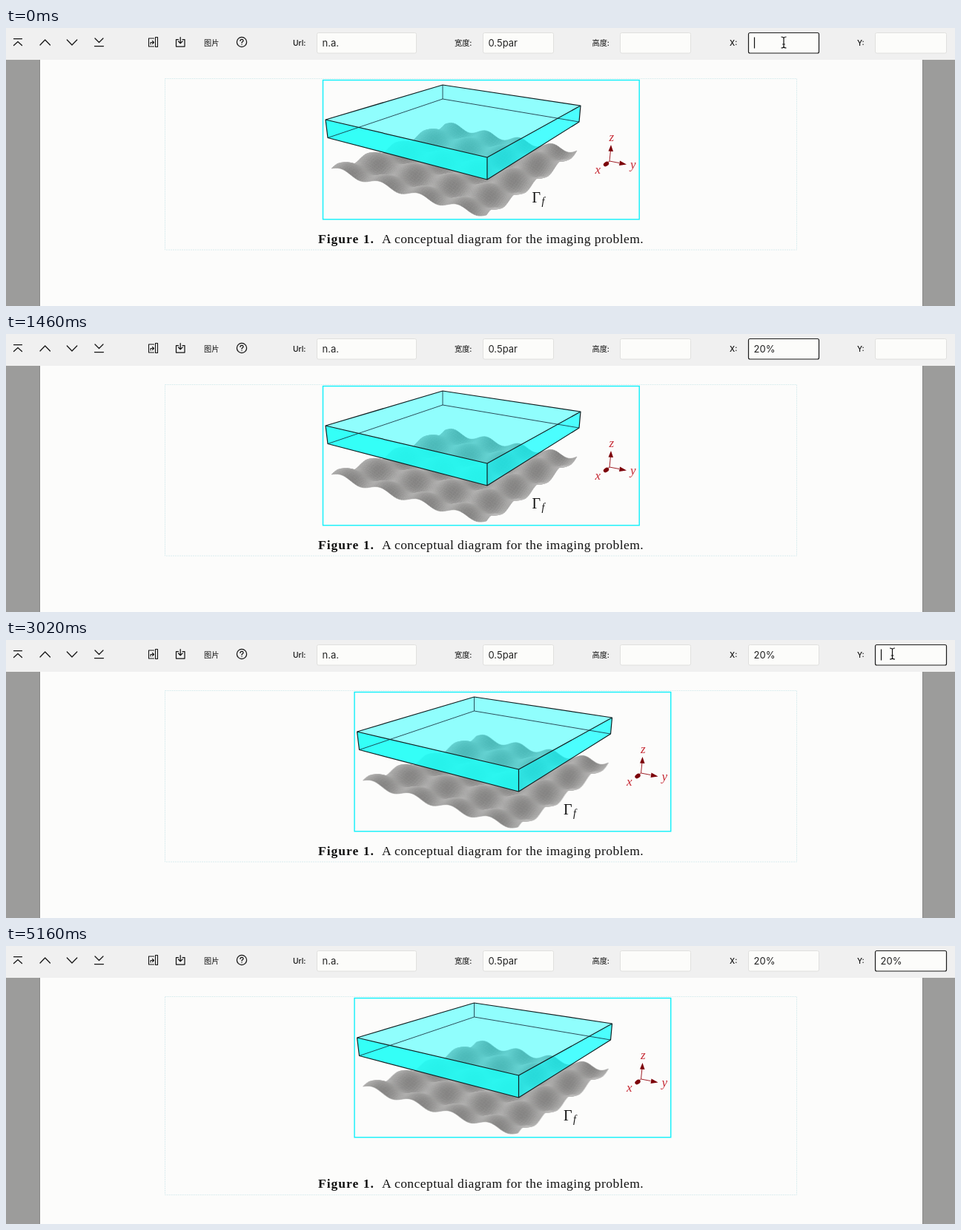
An HTML page with a canvas for the animation above (5180 ms loop, 1280 px wide and 376 px high).

```html
<!DOCTYPE html>
<html lang="zh">
<head>
<meta charset="utf-8">
<style>
html, body { margin: 0; width: 100%; height: 100%; overflow: hidden; background: #fcfcfb; }
canvas, svg { position: absolute; display: block; left: 0; top: 0; }
#surface { left: 430px; top: 110px; }
#stage { width: 100%; height: 100%; overflow: hidden; }
text { white-space: pre; }
.label { font: 500 10.2px Inter, "Noto Sans CJK SC", "Noto Sans CJK", sans-serif; fill: #111; }
.value { font: 13px Inter, sans-serif; fill: #222; }
.field { fill: #fcfcfa; stroke: #e0e0de; }
.field.focus { stroke: #1c1c1c; stroke-width: 1.2; }
.icon { fill: none; stroke: #151515; stroke-width: 1.25; stroke-linecap: round; stroke-linejoin: round; }
.math { font: italic 17px "Liberation Serif", serif; }
#caption { font: 17.5px "Liberation Serif", serif; letter-spacing: .45px; fill: #111; }
#caption .head { font-weight: bold; letter-spacing: 1px; }
</style>
</head>
<body>
<canvas id="surface" width="350" height="150"></canvas>
<svg id="stage" viewBox="0 0 1280 376">
  <path d="M0 43H45.5V376H0zM1236.5 43H1280V376H1236.5z" fill="#9c9c9b"/>
  <path d="M45.5 43V376M1236.5 43V376" stroke="#878786"/>
  <rect id="frame" x="214.5" y="68.5" width="852" height="231.5" fill="none" stroke="#d8ecee" stroke-dasharray="2 1"/>

  <g id="figure">
    <path d="M431 124L589 77 775 105 649 175z" fill="#0ff" fill-opacity=".43"/>
    <path d="M431 124L649 175V205L434 148.5z" fill="#1cfff8" fill-opacity=".89"/>
    <path d="M775 105L649 175V205L773 127z" fill="#0ff" fill-opacity=".7"/>
    <path d="M589 77V96L434 148.5M589 96L773 127" fill="none" stroke="#123" stroke-width=".8"/>
    <path d="M431 124L589 77 775 105 649 175zL434 148.5 649 205 773 127 775 105M649 175V205" fill="none" stroke="#102022" stroke-width="1.2" stroke-linejoin="round"/>
    <path d="M814 180L815.5 165M814 180L827 182.5M814 180L809 184" stroke="#a02028" fill="none"/>
    <path d="M816 158L819 167 812.5 166.5zM837 184.5L827 186 828 179.5z" fill="#7c0008"/>
    <ellipse cx="809.5" cy="184" rx="4" ry="2.8" transform="rotate(-35 809.5 184)" fill="#7c0008"/>
    <g class="math" fill="#c62a34">
      <text x="813.5" y="153">z</text><text x="794.5" y="197">x</text><text x="842" y="190">y</text>
    </g>
    <text x="709.5" y="236" font-family="Liberation Serif, serif" font-size="20" fill="#111">Γ</text>
    <text x="722.5" y="238.5" class="math" style="font-size:14px" fill="#111">f</text>
    <rect x="427.5" y="70.5" width="426.7" height="188.3" fill="none" stroke="#0ff0fa" stroke-width="1.4"/>
  </g>
  <text id="caption" y="290.5"><tspan class="head" x="421">Figure 1.</tspan><tspan x="507">A conceptual diagram for the imaging problem.</tspan></text>

  <rect width="1280" height="43" fill="#f0f0f0"/>
  <g class="icon">
    <path d="M10.5 14.5H21.5M10.5 23.5L16 18.5 21.5 23.5"/>
    <path d="M46 23L52.7 16 59.5 23M82.3 16L89 23 95.8 16"/>
    <path d="M119.5 24.5H131.5M120 14L125.5 19.5 131 14"/>
    <path d="M199.5 14H192.5V25H199.5M201.5 12.5H204.5V25.5H201.5zM195 22V19.5H199M197.5 17.5L199.5 19.5 197.5 21.5" stroke-width="1.1"/>
    <path d="M232.5 15.5H229.5V25H241V15.5H238M235.2 12.5V20.5M232.5 18L235.2 20.8 238 18"/>
    <circle cx="318" cy="19" r="6.6"/>
    <path d="M315.9 17.4Q316 15.3 318 15.3T320.1 17.2C320.1 18.6 318 18.6 318 20.3M318 22.4V22.5"/>
  </g>
  <g class="label">
    <text x="267" y="23.5">图片</text><text x="387" y="24">Url:</text><text x="605" y="24">宽度:</text>
    <text x="790.5" y="24">高度:</text><text x="976" y="24">X:</text><text x="1148" y="24">Y:</text>
  </g>
  <g id="fields"></g>
  <path id="caret" stroke="#111" stroke-width="1.2"/>
  <path id="beam" d="M-3.5 -7.5Q0 -7.5 0 -5.5Q0 -7.5 3.5 -7.5M0 -6V6M-3.5 7.5Q0 7.5 0 5.5Q0 7.5 3.5 7.5M-1.8 2.5H1.8" fill="none" stroke="#111" stroke-width="1.2"/>
  <path id="arrow" d="M-3 -7V6L0 3.2 2 8 4 7.2 2 2.5H6z" fill="#111" stroke="#fff"/>
</svg>
<script>
const LOOP = 5180;
const $ = id => document.getElementById(id);

function addField(x, width, value) {
  const box = `<rect class="field" x="${x}" y="6.5" width="${width}" height="27.5" rx="2"/>`;
  $("fields").insertAdjacentHTML("beforeend", `<g>${box}<text class="value" x="${x + 7}" y="25">${value}</text></g>`);
  const group = $("fields").lastElementChild;
  return { x: x + 7, box: group.firstChild, text: group.lastChild };
}
addField(419.5, 134, "n.a.");
addField(643.5, 95, "0.5par");
addField(828.5, 95, "");
const fieldX = addField(1001.5, 95, "");
const fieldY = addField(1172.5, 96, "");

// Wavy sheet: sagging patch between four corners, painted back to front.
function drawSurface() {
  const ctx = $("surface").getContext("2d"), n = 64, d = 1 / n, k = 8 * Math.PI;
  const mix = (a, b, t) => a + (b - a) * t;
  const point = (u, v) => {
    const sag = 2 + 8 * u * (1 - u) + 12 * v * (1 - v);
    const wave = 4 * (Math.sin(k * u) + Math.sin(k * v));
    return [
      mix(mix(439, 648, u), mix(592, 770, u), v),
      mix(mix(188, 251, u), mix(128, 164, u), v) + sag - wave
    ];
  };
  ctx.translate(-430, -110);
  ctx.lineWidth = .6;
  for (let j = n - 1; j >= 0; j--) for (let i = 0; i < n; i++) {
    const u = i * d, v = j * d;
    const s = 160 + 18 * Math.cos(k * (u + d / 2)) - 11 * Math.cos(k * (v + d / 2));
    ctx.fillStyle = ctx.strokeStyle = `rgb(${s + 1},${s},${s - 1})`;
    ctx.beginPath();
    for (const p of [[u, v], [u + d, v], [u + d, v + d], [u, v + d]]) ctx.lineTo(...point(...p));
    ctx.closePath();
    ctx.fill();
    ctx.stroke();
  }
}

const typed = (t, times) => "20%".slice(0, times.filter(s => t >= s).length);
const keysX = [780, 860, 920], keysY = [3480, 3620, 3860];
const FOCUS_Y = 2760;

function caretOn(t) {
  const starts = [-200, ...keysX, FOCUS_Y, 3480, 3620];
  const last = starts.filter(s => t >= s).pop();
  return (t - last) % 1000 < 500;
}

function show(el, on) { el.style.display = on ? "" : "none"; }

function render(t) {
  const onY = t >= FOCUS_Y, active = onY ? fieldY : fieldX;
  fieldX.text.textContent = typed(t, keysX);
  fieldY.text.textContent = typed(t, keysY);
  fieldX.box.classList.toggle("focus", !onY);
  fieldY.box.classList.toggle("focus", onY);

  const x = active.x + active.text.getComputedTextLength() + 1;
  $("caret").setAttribute("d", `M${x} 12.5V27.5`);
  show($("caret"), caretOn(t));

  const shift = t >= 1860 ? 42.5 : 0, drop = t >= 4160 ? 36.7 : 0;
  $("figure").setAttribute("transform", `translate(${shift})`);
  $("surface").style.transform = `translateX(${shift}px)`;
  $("caption").setAttribute("transform", `translate(0 ${drop})`);
  $("frame").setAttribute("height", 231.5 + drop);

  const p = Math.min(1, Math.max(0, (t - 2300) / 360)), e = p * p * (3 - 2 * p);
  const mx = 1049 + 146.5 * e, my = 19.5 - e - 11 * Math.sin(Math.PI * e);
  const visible = t < keysX[0] || (t >= 2300 && t < keysY[0]);
  const between = mx > 1097 && mx < 1173;
  for (const id of ["beam", "arrow"]) {
    $(id).setAttribute("transform", `translate(${mx} ${my})`);
    show($(id), visible && between === (id === "arrow"));
  }
}

drawSurface();
const start = performance.now();
function tick() {
  render((performance.now() - start) % LOOP);
  requestAnimationFrame(tick);
}
tick();
</script>
</body>
</html>
```
